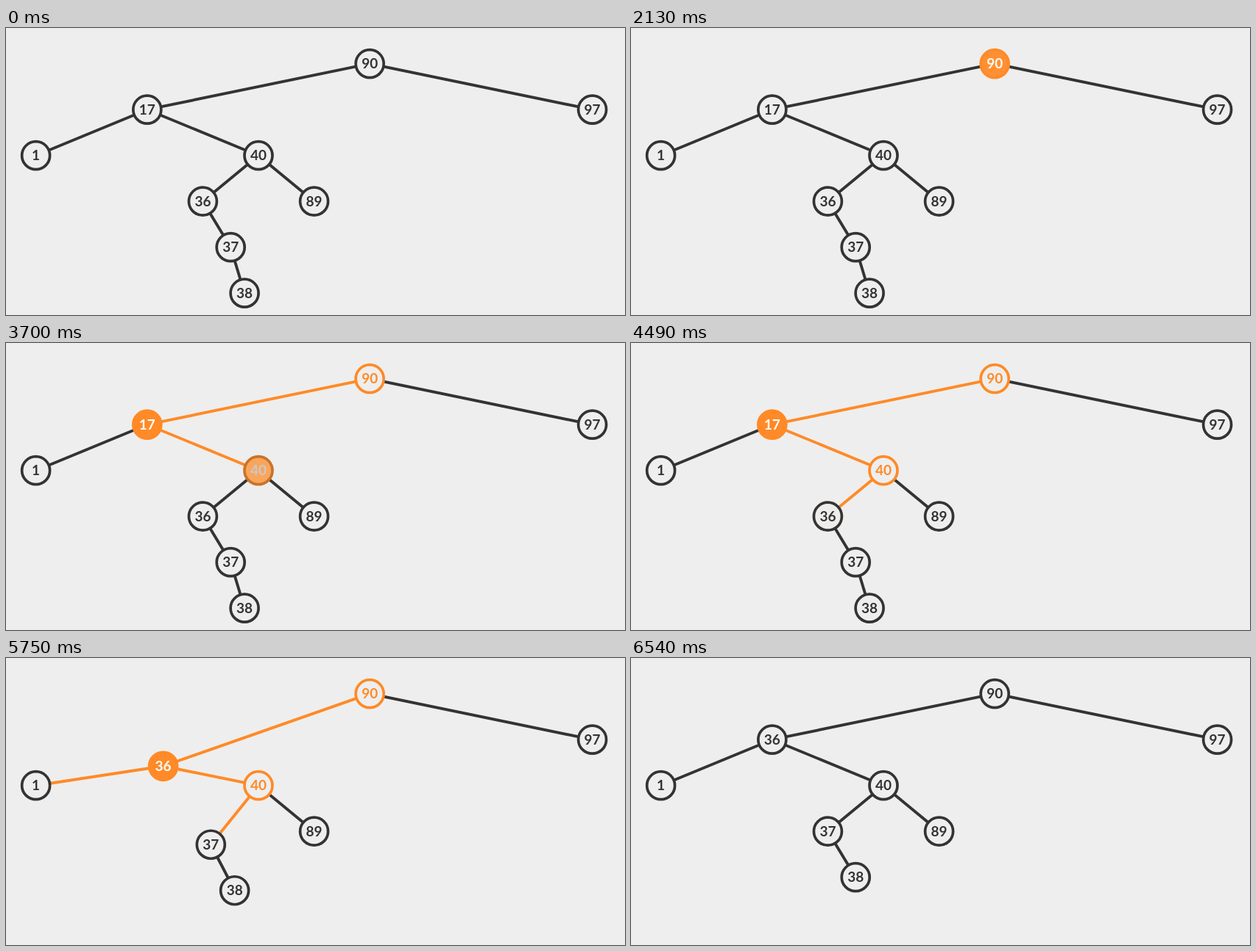
An HTML page for the animation above (9.19 s loop, 841x391 px).

```html
<!DOCTYPE html>
<html lang="en">
<head>
<meta charset="utf-8">
<title>Binary search tree: remove a key</title>
<style>
html, body { margin: 0; width: 100%; height: 100%; overflow: hidden; background: #eee; }
svg { display: block; width: 100%; height: 100%; }
line { stroke-width: 3.9; }
circle { stroke-width: 3.7; }
text { font-family: Lato, "Open Sans", sans-serif; font-weight: 700; text-anchor: middle; }
</style>
</head>
<body>
<svg id="stage" viewBox="0 0 841 391"></svg>
<script>
const LOOP = 9190;
const START = 1338;  // first tree step begins
const STEP = 514;    // length of one tree step
const R = 19, FONT = 19;

// The picture is held between these times
const TICKS = [
  1510, 1670, 1820, 1980, 2140, 2290, 2450,
  2600, 2750, 2930, 3080, 3230, 3380, 3530,
  3700, 3860, 4020, 4170, 4330, 4490, 4640,
  4790, 4950, 5110, 5270, 5430, 5580, 5750,
  5900, 6060, 6220, 6380, 6540
];

const PAPER = [238, 238, 238], INK = [51, 51, 51];
const ORANGE = [255, 138, 39], WHITE = [255, 255, 255];

// Node styles: fill, stroke, text
const PLAIN = [PAPER, INK, INK];
const FULL = [ORANGE, ORANGE, WHITE];
const RING = [PAPER, ORANGE, ORANGE];

// Tree steps
const RELINK = 7, MOVE = 8, RESET = 9;

const at = (col, row) => [494.2 + 18.9 * col, 48.7 + 62.5 * row];

const nodes = {
  90: { home: at(0, 0), looks: [[0, FULL], [1, RING], [RESET, PLAIN]] },
  17: { home: at(-16, 1), looks: [[2, FULL]], removed: true },
  97: { home: at(16, 1) },
  1: { home: at(-24, 2) },
  40: { home: at(-8, 2), looks: [[4, FULL], [5, RING], [RESET, PLAIN]] },
  36: { home: at(-12, 3), goal: at(-16, 1), looks: [[6, FULL], [RESET, PLAIN]] },
  89: { home: at(-4, 3) },
  37: { home: at(-10, 4), goal: at(-12, 3) },
  38: { home: at(-9, 5), goal: at(-10, 4) }
};

// grow: step in which the highlight runs along the edge; tint: step in which it fades in
const edges = [
  { from: 90, to: 97 },
  { from: 40, to: 89 },
  { from: 37, to: 38 },
  { from: 90, to: 17, grow: 1, removed: true },
  { from: 17, to: 1, next: 36, tint: RELINK },
  { from: 17, to: 40, next: 36, grow: 3 },
  { from: 36, to: 37, next: 40, tint: RELINK },
  { from: 40, to: 36, next: 90, grow: 5 }
];

const clamp = v => Math.max(0, Math.min(1, v));
const ease = v => {
  v = clamp(v);
  return v < 0.5 ? 4 * v ** 3 : 1 - 4 * (1 - v) ** 3;
};
const mix = (a, b, k) => a.map((v, i) => v + (b[i] - v) * k);
const rgb = c => `rgb(${c.map(Math.round).join(",")})`;

const stage = document.getElementById("stage");
function add(tag, attrs = {}) {
  const el = document.createElementNS("http://www.w3.org/2000/svg", tag);
  set(el, attrs);
  return stage.appendChild(el);
}
function set(el, attrs) {
  for (const name in attrs) el.setAttribute(name, attrs[name]);
}

for (const edge of edges) {
  edge.base = add("line");
  edge.glow = add("line", { stroke: rgb(ORANGE) });
}
for (const key in nodes) {
  nodes[key].disc = add("circle");
  nodes[key].label = add("text");
  nodes[key].label.textContent = key;
}

const place = (key, u) => {
  const { home, goal } = nodes[key];
  return goal ? mix(home, goal, ease(u - MOVE)) : home;
};

function look(node, u) {
  let style = PLAIN;
  for (const [step, next] of node.looks || []) {
    const k = ease(u - step);
    style = style.map((c, i) => mix(c, next[i], k));
  }
  return style;
}

const span = (el, a, b) => set(el, { x1: a[0], y1: a[1], x2: b[0], y2: b[1] });

function drawEdge(edge, u) {
  const relink = ease(u - RELINK);
  let a = place(edge.from, u), b = place(edge.to, u);
  if (edge.next) a = mix(a, place(edge.next, u), relink);
  if (edge.removed) b = mix(b, a, relink);

  const grown = edge.grow ? ease(u - edge.grow) : 0;
  let heat = edge.tint ? ease(u - edge.tint) : Math.floor(grown);
  heat *= 1 - ease(u - RESET);

  span(edge.base, a, b);
  set(edge.base, {
    stroke: rgb(mix(INK, ORANGE, heat)),
    visibility: edge.removed && relink === 1 ? "hidden" : "visible"
  });
  span(edge.glow, a, mix(a, b, grown));
  set(edge.glow, { visibility: grown > 0 && grown < 1 ? "visible" : "hidden" });
}

function drawNode(key, u) {
  const node = nodes[key];
  const [x, y] = place(key, u);
  const [fill, stroke, ink] = look(node, u).map(rgb);
  const size = node.removed ? 1 - ease(u - RELINK) : 1;
  const visibility = size > 0 ? "visible" : "hidden";
  set(node.disc, {
    cx: x, cy: y, r: R * size, fill, stroke, visibility
  });
  set(node.label, {
    x, y: y + 6.7 * size, "font-size": FONT * size, fill: ink, visibility
  });
}

function draw(ms) {
  const tick = TICKS.filter(t => t <= ms).pop() || 0;
  const u = (tick - START) / STEP;
  for (const edge of edges) drawEdge(edge, u);
  for (const key in nodes) drawNode(key, u);
}

const begin = performance.now();
function frame() {
  draw((performance.now() - begin) % LOOP);
  requestAnimationFrame(frame);
}
frame();
</script>
</body>
</html>
```
